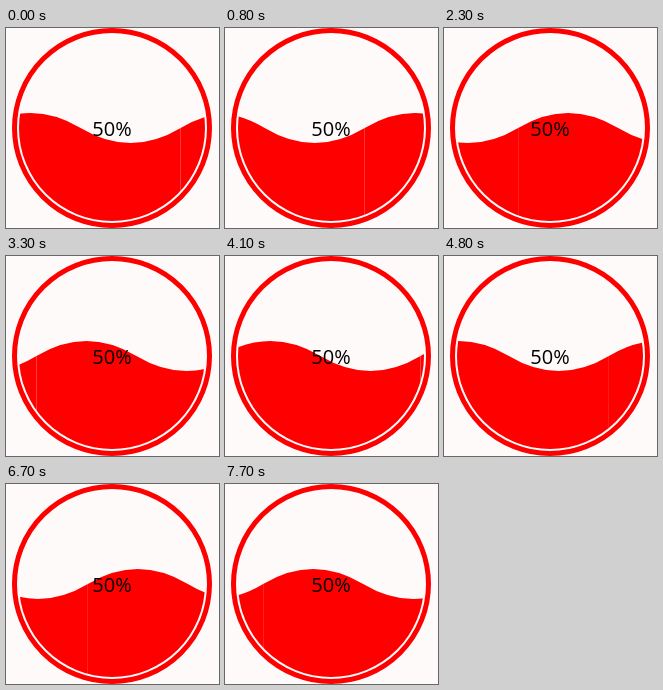
Animation, 213 px wide and 200 px high, one loop 7.8 s. Source, as an HTML page:

```html
<!DOCTYPE html>
<html lang="en">
<head>
<meta charset="utf-8">
<title>Liquid gauge</title>
<style>
  html, body { margin: 0; width: 100%; height: 100%; overflow: hidden; background: #fffafa; }
  svg { display: block; }
  text { font: 20px "Open Sans", "Noto Sans", sans-serif; text-anchor: middle; }
</style>
</head>
<body>
<svg width="213" height="200" viewBox="0 0 213 200">
  <defs>
    <clipPath id="bowl"><circle cx="106" cy="100" r="93"/></clipPath>
    <path id="wave" d="M0 100Q50 70 100 100T200 100V200H0Z"/>
  </defs>
  <circle cx="106" cy="100" r="97.5" fill="none" stroke="red" stroke-width="5"/>
  <g clip-path="url(#bowl)" fill="red">
    <g id="water">
      <use href="#wave" x="-200"/>
      <use href="#wave"/>
    </g>
  </g>
  <text x="106" y="108">50%</text>
</svg>
<script>
  const LOOP = 7800, STEP = 100, WAVELENGTH = 200;
  const START = 174.65, SPEED = 0.0437; // px, px per ms
  const water = document.getElementById('water');

  function draw() {
    const time = Math.floor(performance.now() % LOOP / STEP) * STEP;
    const x = (START - SPEED * time + 2 * WAVELENGTH) % WAVELENGTH;
    water.setAttribute('transform', `translate(${x} 0)`);
    requestAnimationFrame(draw);
  }
  draw();
</script>
</body>
</html>
```
